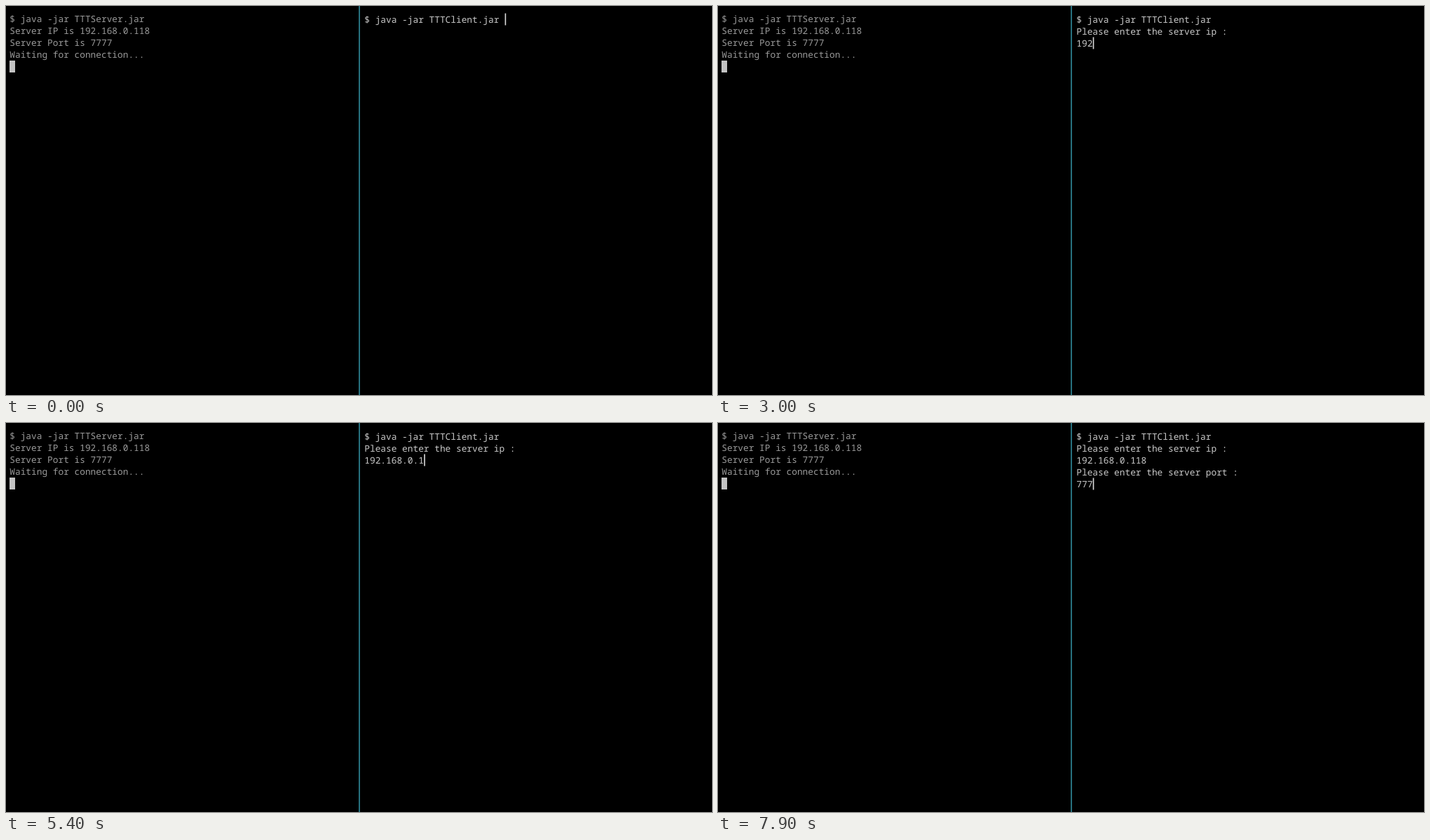
An HTML page that plays this animation: 1007 px wide and 556 px high, repeating every 8000 ms.

```html
<!DOCTYPE html>
<html lang="en">
<head>
<meta charset="utf-8">
<title>Two terminals</title>
<style>
html, body { margin: 0; width: 100%; height: 100%; overflow: hidden; background: #000; }
svg { display: block; }
text {
  font: 500 12.82px "Noto Sans Mono", "DejaVu Sans Mono", monospace;
  white-space: pre;
  text-rendering: geometricPrecision;
}
</style>
</head>
<body>
<svg width="1007" height="556" viewBox="0 0 1007 556">
  <rect width="1007" height="556" fill="#000"/>
  <rect x="503" width="2" height="556" fill="#27707e"/>
  <g id="server" fill="#9a9a9a"></g>
  <rect x="5" y="78" width="8" height="17" fill="#c3c3c3"/>
  <g id="client" fill="#cacaca"></g>
  <rect id="caret" width="1.6" height="17" fill="#dcdcdc"/>
</svg>
<script>
const LOOP = 8000, BLINK = 500, LINE = 17, CELL = 7.692;
const LEFT = 511.3;

// Terminal output as [time, text] pairs
const events = [
  [0, "$ java -jar TTTClient.jar "],
  [1300, "\n"],
  [1500, "Please enter the server ip :\n"],
  ...typed("192.168", 2600, 200),
  ...typed(".0.", 4100, 300),
  ...typed("1", 5100, 0),
  ...typed("18", 5500, 200),
  [5900, "\n"],
  [6000, "Please enter the server port :\n"],
  ...typed("777", 7300, 200)
];

function typed(text, start, gap) {
  return [...text].map((ch, i) => [start + i * gap, ch]);
}

function addLine(parent, x, y, value = "") {
  const el = document.createElementNS("http://www.w3.org/2000/svg", "text");
  el.setAttribute("x", x);
  el.setAttribute("y", y);
  el.textContent = value;
  parent.append(el);
  return el;
}

const server = document.getElementById("server");
const client = document.getElementById("client");
const caret = document.getElementById("caret");

[
  "$ java -jar TTTServer.jar",
  "Server IP is 192.168.0.118",
  "Server Port is 7777",
  "Waiting for connection..."
].forEach((line, i) => addLine(server, 5.3, 23 + i * LINE, line));

const rows = Array.from({ length: 5 }, (_, i) => addLine(client, LEFT, 24 + i * LINE));

function draw(t) {
  const past = events.filter(([at]) => at <= t);
  const lines = past.map(([, text]) => text).join("").split("\n");
  rows.forEach((row, i) => {
    const value = lines[i] || "";
    if (row.textContent !== value) row.textContent = value;
  });

  // Every output restarts the blink with the caret visible
  const idle = t - past[past.length - 1][0];
  const row = lines.length - 1;
  caret.setAttribute("x", LEFT + 0.3 + lines[row].length * CELL);
  caret.setAttribute("y", 10.5 + row * LINE);
  caret.setAttribute("visibility", idle % (2 * BLINK) < BLINK ? "visible" : "hidden");
}

const start = performance.now();
function tick() {
  draw((performance.now() - start) % LOOP);
  requestAnimationFrame(tick);
}
tick();
</script>
</body>
</html>
```
